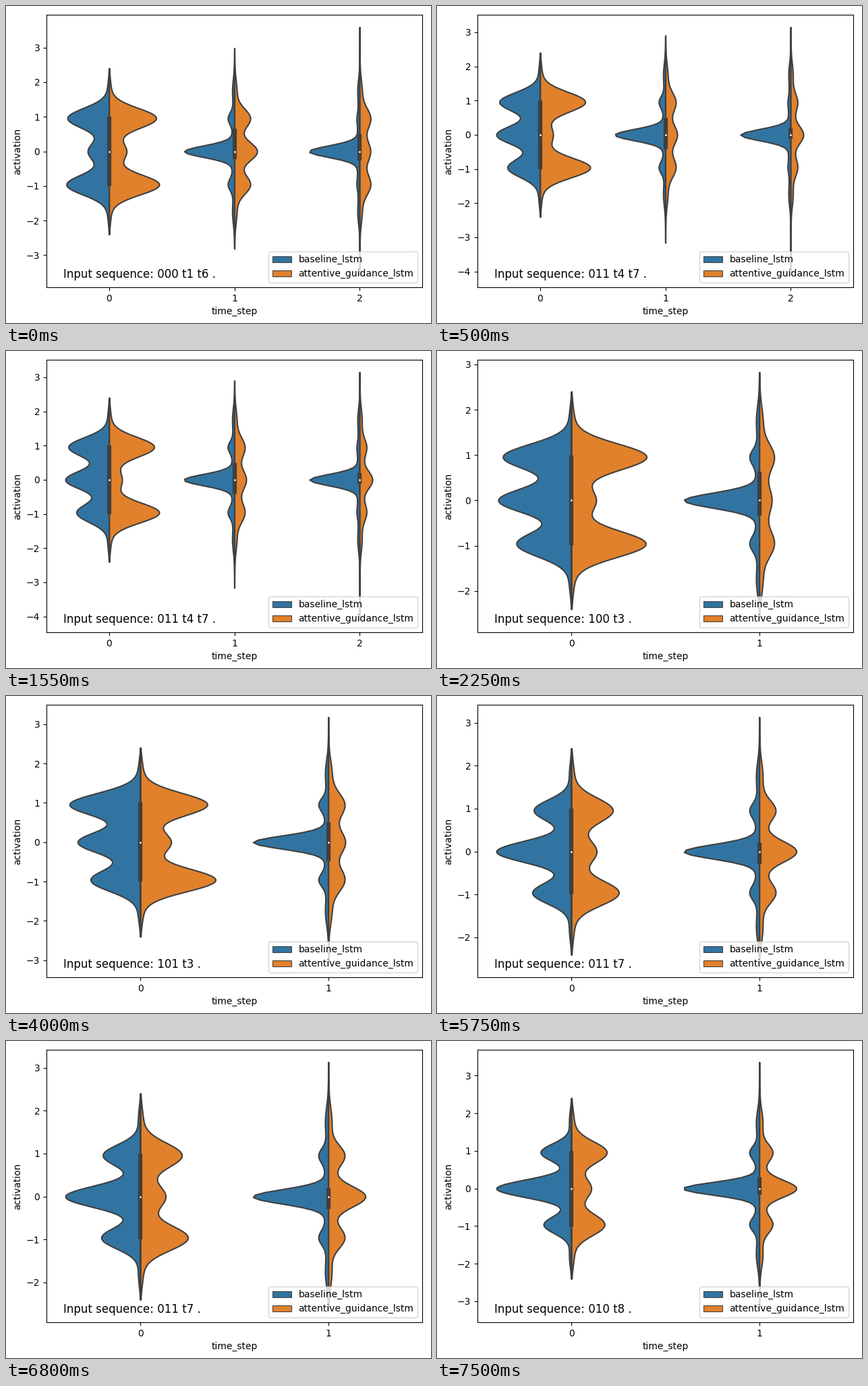
These frames come from a looping animation (630x470 px, 8000 ms). A matplotlib script:

```python
import math

import numpy as np
import matplotlib.pyplot as plt
from matplotlib.animation import FuncAnimation
from matplotlib.patches import Patch

WIDTH, HEIGHT, DPI = 630, 470, 100
LEFT, RIGHT, TOP, BOTTOM = 60, 617, 13, 417
STEP_MS, LOOP_MS, HOLD_MS, LEAD_MS = 250, 8000, 1750, 1250
BLUE, ORANGE, GRAY = "#3274a1", "#e1812c", "#3f3f3f"
LINE = 1.5
HALF_WIDTH = 0.4
PEAK = 0.96

FIRST_SUPPORT, FIRST_QUARTILES = (-2.4, 2.4), (-0.95, 0.95)

plt.rcParams["font.family"] = "DejaVu Sans"

# Scene: text, blue and orange peak heights (low, mid, high) at step 0,
# then per later step: support, quartiles, orange heights (side, mid).
SCENES = [
    ("000 t1 t6 .", (0.85, 0.42, 0.83), (1.0, 0.34, 0.94), [
        ((-2.81, 2.98), (-0.17, 0.59), (0.28, 0.40)),
        ((-3.57, 3.59), (-0.20, 0.44), (0.18, 0.16))]),
    ("011 t4 t7 .", (0.65, 0.87, 0.81), (1.0, 0.25, 0.90), [
        ((-3.16, 2.90), (-0.36, 0.43), (0.17, 0.18)),
        ((-4.10, 3.15), (-0.06, 0.14), (0.10, 0.20))]),
    ("100 t3 .", (0.73, 0.97, 0.91), (0.99, 0.32, 1.0), [
        ((-2.64, 2.83), (-0.29, 0.59), (0.16, 0.11))]),
    ("101 t3 .", (0.66, 0.83, 0.94), (1.0, 0.40, 0.89), [
        ((-3.12, 3.18), (-0.44, 0.46), (0.18, 0.17))]),
    ("011 t7 .", (0.52, 1.0, 0.50), (0.63, 0.33, 0.55), [
        ((-2.64, 3.13), (-0.24, 0.15), (0.18, 0.44))]),
    ("010 t8 .", (0.37, 1.0, 0.41), (0.44, 0.26, 0.47), [
        ((-3.23, 3.36), (-0.12, 0.24), (0.14, 0.44))]),
]

fig = plt.figure(figsize=(WIDTH / DPI, HEIGHT / DPI), dpi=DPI)
ax = fig.add_axes([LEFT / WIDTH, 1 - BOTTOM / HEIGHT,
                   (RIGHT - LEFT) / WIDTH, (BOTTOM - TOP) / HEIGHT])
caption = fig.text(84.6 / WIDTH, 67 / HEIGHT, "", fontsize=12)


def bell(y, center, sigma):
    return np.exp(-0.5 * ((y - center) / sigma) ** 2)


def density(y, heights, base):
    """Three peaks whose bandwidth follows the spread of their mass."""
    low, mid, high = heights
    spread = math.sqrt((low + high) / (low + mid + high))
    bandwidth = np.clip(0.357 * spread, 0.165, 0.295)
    total = base * bell(y, 0, 1.1)
    for center, height in zip((-PEAK, 0, PEAK), heights):
        total += height * bell(y, center, bandwidth)
    for center in (-1.8, 1.8):
        total += 0.03 * bell(y, center, 0.3)
    return total / max(1, total.max())


def draw_violin(x, support, quartiles, blue, orange):
    y = np.linspace(*support, 100)
    base = 0.055 if x else 0
    for side, color, heights in ((-1, BLUE, blue), (1, ORANGE, orange)):
        edge = x + side * HALF_WIDTH * density(y, heights, base)
        ax.fill_betweenx(y, edge, x, facecolor=color, edgecolor=GRAY,
                         linewidth=LINE)
    q1, q3 = quartiles
    reach = 1.5 * (q3 - q1)
    whisker = np.clip((q1 - reach, q3 + reach), *0.85 * np.array(support))
    ax.plot([x, x], whisker, color=GRAY, linewidth=LINE)
    ax.plot([x, x], quartiles, color=GRAY, linewidth=3 * LINE)
    ax.scatter(x, 0, s=(2 * LINE) ** 2, color="white", edgecolor=GRAY,
               linewidth=1, zorder=3)


def build_violins(blue, orange, later):
    violins = [(FIRST_SUPPORT, FIRST_QUARTILES, blue, orange)]
    for step, (support, quartiles, (side, mid)) in enumerate(later, 1):
        bump = 0.1 / step ** 2
        violins.append((support, quartiles, (bump, 1, bump), (side, mid, side)))
    return violins


def draw(frame):
    text, *shapes = SCENES[(frame * STEP_MS + LEAD_MS) // HOLD_MS]
    violins = build_violins(*shapes)
    ax.clear()
    for x, violin in enumerate(violins):
        draw_violin(x, *violin)

    low = min(violin[0][0] for violin in violins)
    high = max(violin[0][1] for violin in violins)
    margin = 0.05 * (high - low)
    low, high = low - margin, high + margin
    ax.set_xticks(range(len(violins)))
    ax.set_yticks(range(math.ceil(low), math.floor(high) + 1))
    ax.set_xlim(-0.5, len(violins) - 0.5)
    ax.set_ylim(low, high)
    ax.set_xlabel("time_step")
    ax.set_ylabel("activation")

    keys = [Patch(facecolor=color, edgecolor=GRAY, linewidth=LINE / 2, label=label)
            for color, label in ((BLUE, "baseline_lstm"),
                                 (ORANGE, "attentive_guidance_lstm"))]
    ax.legend(handles=keys, loc="lower right")
    caption.set_text("Input sequence: " + text)
    return []


anim = FuncAnimation(fig, draw, frames=LOOP_MS // STEP_MS, interval=STEP_MS,
                     init_func=lambda: [], repeat=True, repeat_delay=0)
plt.show()
```
